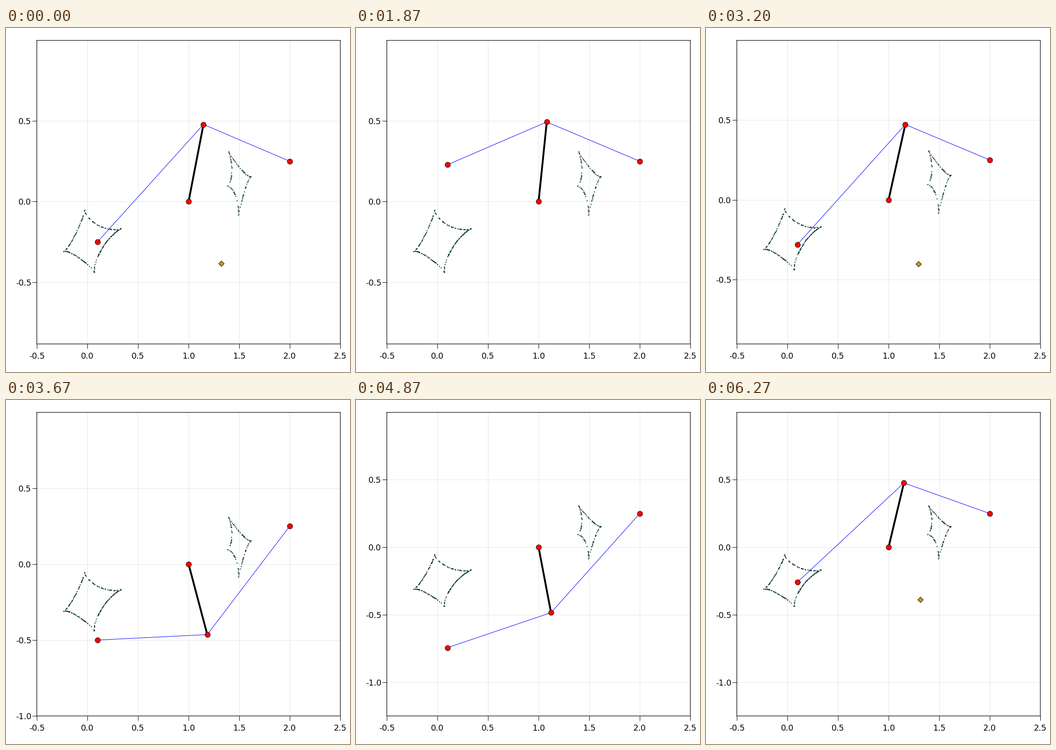
Write a matplotlib script that moves like this. It is 748 by 748 pixels and loops after 6340 ms.

```python
import numpy as np
import matplotlib.pyplot as plt
from matplotlib.animation import FuncAnimation
from matplotlib.ticker import FuncFormatter, MultipleLocator

# Zeeman catastrophe machine: a wheel arm pulled by two springs
SIZE, DPI = 748, 100
PX = 72 / DPI
TICK_MS, LOOP_MS = 20, 6340
POSES, POSES_PER_SEC = 95, 15
HUB, ANCHOR = np.array([1.0, 0.0]), np.array([2.0, 0.25])
R, REST = 0.5, 0.25
TOP, PAD = 0.999, 0.5


def wheel(theta):
    """Rim point, tangent and outward normal."""
    n = np.stack([np.cos(theta), np.sin(theta)], -1)
    t = np.stack([-np.sin(theta), np.cos(theta)], -1)
    return HUB + R * n, t, n


def spring(end, w, t, n):
    """Length and tangential / normal direction cosines of a spring."""
    v = end - w
    d = np.linalg.norm(v, axis=-1)
    return d, (v * t).sum(-1) / d, (v * n).sum(-1) / d


def slope(d, p):
    return -(d - REST) * p


def curvature(d, p, q):
    return R * p**2 + (d - REST) * (R * q**2 / d + q)


def crossings(x, y):
    """Linear roots of y(x) along the last axis: row indices and x values."""
    a, b = y[..., :-1], y[..., 1:]
    rows, cols = np.nonzero(a * b < 0)
    ya, yb = a[rows, cols], b[rows, cols]
    return rows, x[cols] + (x[cols + 1] - x[cols]) * ya / (ya - yb)


def stable_points(ctrl):
    """Energy minima on the rim, highest first."""
    theta = np.linspace(-np.pi, np.pi, 3601)
    w, t, n = wheel(theta)
    force = sum(slope(*spring(e, w, t, n)[:2]) for e in (ctrl, ANCHOR))
    i = np.nonzero((force[:-1] < 0) & (force[1:] >= 0))[0]
    frac = force[i] / (force[i] - force[i + 1])
    pts = wheel(theta[i] + frac * (theta[1] - theta[0]))[0]
    return pts[np.argsort(-pts[:, 1])]


def bifurcation_set(theta):
    """Control positions where slope and curvature of the energy both vanish."""
    w, t, n = wheel(theta)
    d2, p2, q2 = spring(ANCHOR, w, t, n)
    pull, bend = slope(d2, p2), curvature(d2, p2, q2)
    d = np.geomspace(1e-4, 2.5, 3000)
    p = np.clip(pull[:, None] / (d - REST), -1, 1)
    root = np.sqrt(1 - p**2)
    found = []
    for sign in (1, -1):
        i, ds = crossings(d, curvature(d, p, sign * root) + bend[:, None])
        ps = pull[i] / (ds - REST)
        real = np.abs(ps) <= 1
        i, ds, ps = i[real], ds[real, None], ps[real, None]
        qs = sign * np.sqrt(1 - ps**2)
        found.append(w[i] + ds * (ps * t[i] + qs * n[i]))
    return np.concatenate(found)


def scatter_evenly(pts, count, reach=0.012):
    """Random pick with a density that is even along the curve."""
    near = [(np.hypot(*(pts - c).T) < reach).sum() for c in pts]
    weight = 1 / np.array(near)
    rng = np.random.default_rng(12)
    return pts[rng.choice(len(pts), count, replace=False, p=weight / weight.sum())]


cloud = scatter_evenly(bifurcation_set(np.linspace(-np.pi, np.pi, 1201)), 290)
phase = np.arange(POSES) / POSES_PER_SEC
ctrl = np.stack([np.full(POSES, 0.1), -0.25 + 0.5 * np.sin(phase)], -1)
states = [stable_points(c) for c in ctrl]
lowest = [min(c[1], s[-1, 1]) for c, s in zip(ctrl, states)]
floor = np.minimum.accumulate(lowest) - PAD

fig = plt.figure(figsize=(SIZE / DPI, SIZE / DPI), dpi=DPI, facecolor="white")
ax = fig.add_axes([67 / SIZE, 61 / SIZE, 660 / SIZE, 660 / SIZE])
ax.set_xlim(-0.5, 2.5)
ax.set_axisbelow(True)
ax.grid(color="black", alpha=0.1, lw=PX)
for spine in ax.spines.values():
    spine.set(linewidth=1.2 * PX, snap=False)
for axis, pad in ((ax.xaxis, 8), (ax.yaxis, 2)):
    axis.set_major_locator(MultipleLocator(0.5))
    axis.set_major_formatter(FuncFormatter(lambda v, _: f"{round(v, 1) + 0.0:.1f}"))
    axis.set_tick_params(length=10 * PX, width=PX, pad=pad * PX,
                         labelsize=17.6 * PX, labelfontfamily="DejaVu Sans")

edge = dict(markeredgecolor="black", markeredgewidth=0.9 * PX, ls="none")
ax.plot(*cloud.T, "o", ms=2.3 * PX, color="#05342a", mew=0, zorder=3)
springs, = ax.plot([], [], color="blue", lw=PX, zorder=4)
arm, = ax.plot([], [], color="black", lw=4 * PX, solid_capstyle="butt", zorder=5)
joints, = ax.plot([], [], "o", ms=11.4 * PX, color="red", zorder=6, **edge)
other, = ax.plot([], [], "D", ms=7.8 * PX, color="#c8961e", zorder=6, **edge)


def draw(i):
    # the pose steps at 15 per second on a finer clock
    k = int((i + 0.6) * TICK_MS * POSES_PER_SEC / 1000)
    c, tip = ctrl[k], states[k][0]
    springs.set_data(*np.array([c, tip, ANCHOR]).T)
    arm.set_data(*np.array([HUB, tip]).T)
    joints.set_data(*np.array([c, ANCHOR, HUB, tip]).T)
    other.set_data(*states[k][1:].T)
    ax.set_ylim(floor[k], TOP)
    return springs, arm, joints, other


anim = FuncAnimation(fig, draw, frames=LOOP_MS // TICK_MS, interval=TICK_MS,
                     repeat=True, repeat_delay=0)
plt.show()
```
